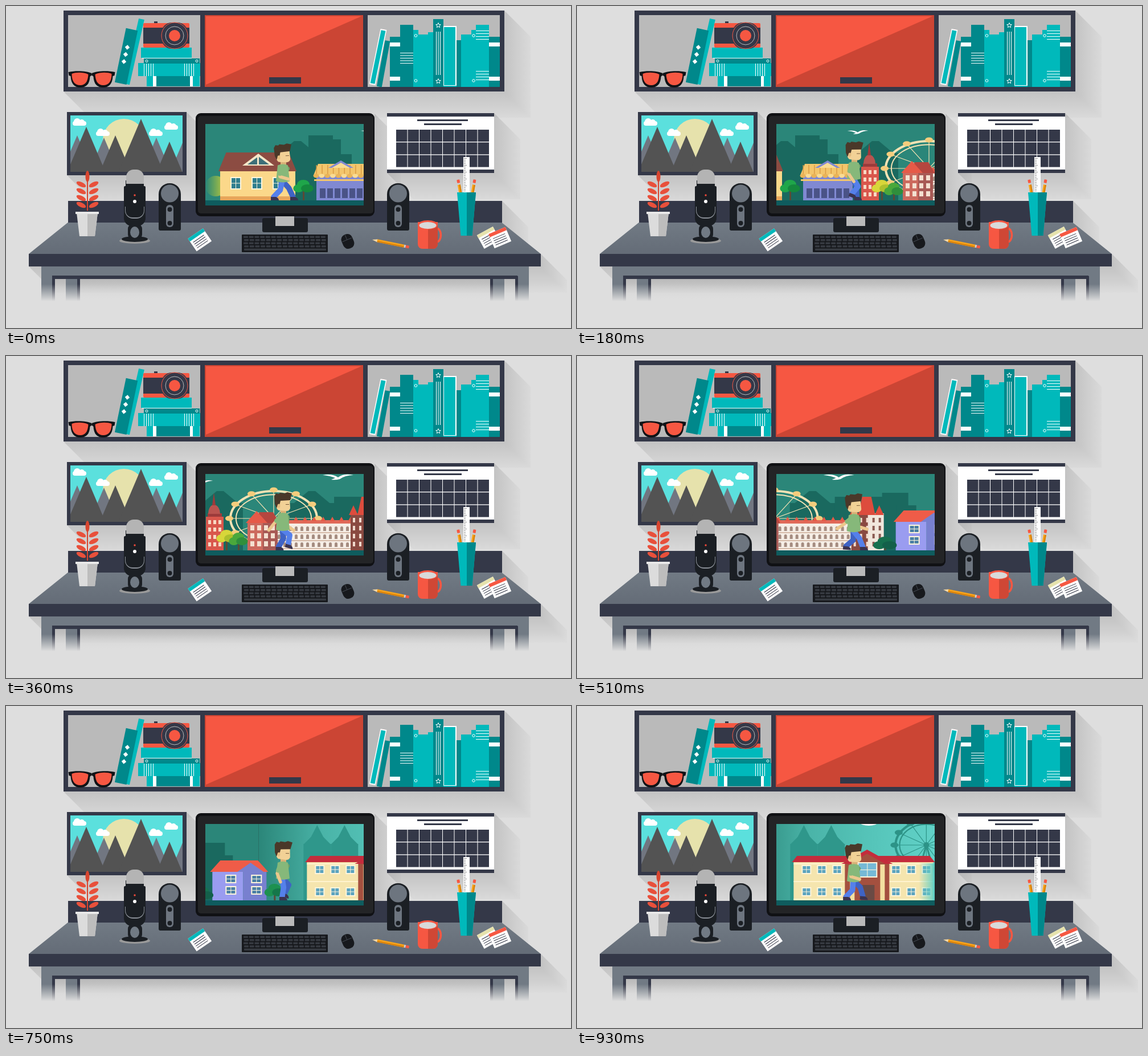
Recreate the animation shown at these times as an HTML page with a canvas. Size 992 px wide and 565 px high, loop 0.96 s.

```html
<!DOCTYPE html>
<html lang="en">
<head>
<meta charset="utf-8">
<title>Desk</title>
<style>
html, body { margin: 0; height: 100%; overflow: hidden; background: #dedede; }
canvas { display: block; }
</style>
</head>
<body>
<canvas id="stage" width="992" height="565"></canvas>
<script>
const stage = document.getElementById('stage');
const desk = document.createElement('canvas');
desk.width = stage.width;
desk.height = stage.height;
let g = desk.getContext('2d');

const { sin, cos, PI } = Math, TAU = 2 * PI;
const TEAL = '#00b9bb', DEEP = '#00888b', RED = '#f65742', BRICK = '#cb4534', DARK = '#343848';
const GREY = '#6d757f', STEEL = '#717a84', BLACK = '#1b1f24', WALL = '#dedede', WHITE = '#fff';

function rect(color, x, y, w, h, r = 0) {
  g.fillStyle = color;
  g.beginPath();
  g.roundRect(x, y, w, h, r);
  g.fill();
}
function disc(color, x, y, rx, ry = rx, turn = 0) {
  g.fillStyle = color;
  g.beginPath();
  g.ellipse(x, y, rx, ry, turn, 0, TAU);
  g.fill();
}
function ring(color, width, x, y, rx, ry = rx) {
  g.strokeStyle = color;
  g.lineWidth = width;
  g.beginPath();
  g.ellipse(x, y, rx, ry, 0, 0, TAU);
  g.stroke();
}
function trace(p) {
  g.beginPath();
  for (let i = 0; i < p.length; i += 2) g.lineTo(p[i], p[i + 1]);
}
function poly(color, ...p) {
  g.fillStyle = color;
  trace(p);
  g.fill();
}
function line(color, width, ...p) {
  g.strokeStyle = color;
  g.lineWidth = width;
  trace(p);
  g.stroke();
}
function path(color, d) {
  g.fillStyle = color;
  g.fill(new Path2D(d));
}
// Symmetric trapezoid around x; a zero top width gives a triangle.
function taper(color, x, top, bottom, topWidth, bottomWidth) {
  const a = topWidth / 2, b = bottomWidth / 2;
  poly(color, x - a, top, x + a, top, x + b, bottom, x - b, bottom);
}
function at(x, y, draw, turn = 0, flip = 1) {
  g.save();
  g.translate(x, y);
  g.rotate(turn);
  g.scale(flip, 1);
  draw();
  g.restore();
}
function grid(cols, rows, x, y, dx, dy, draw) {
  for (let i = 0; i < cols * rows; i++) {
    const col = i % cols, row = Math.floor(i / cols);
    draw(x + col * dx, y + row * dy, col, row);
  }
}
function fade(x0, y0, x1, y1, ...colors) {
  const f = g.createLinearGradient(x0, y0, x1, y1);
  colors.forEach((c, i) => f.addColorStop(i / (colors.length - 1), c));
  return f;
}
// Long 45 degree shadow that fades with its depth.
function shadow(x, y, w, h, d = 46) {
  const from = 'rgba(0,0,0,.12)', to = 'rgba(0,0,0,.02)', r = x + w, b = y + h;
  poly(fade(0, b, 0, b + d, from, to), x, b, r, b, r + d, b + d, x + d, b + d);
  poly(fade(r, 0, r + d, 0, from, to), r, y, r + d, y + d, r + d, b + d, r, b);
}

function drawGlasses() {
  for (const flip of [1, -1]) at(150.5, 0, () => {
    path('#101216', 'M0 118C-8 114-28 113-41 116l1 6 3 1Q-36 143-20 143-4 143-3 124-2 122 0 122Z');
    path(RED, 'M-6 120C-14 116-28 116-35 119Q-35 139-20 139-7 139-6 120Z');
  }, 0, flip);
}
function drawLeaningBook(x, y, w, h, turn, color, cover = color) {
  at(x, y, () => {
    rect(cover, -w / 2, 0, w, h);
    rect(color, -w / 2 + 1.5, 2, w - 3, h - 4);
  }, turn);
}
function drawCamera() {
  rect(DARK, 246, 30, 12, 5);
  rect(DARK, 260, 27, 6, 8);
  rect(RED, 241, 30, 81, 43, 2);
  rect(DARK, 241, 38, 81, 28);
  rect(DARK, 273, 29, 46, 46, 18);
  ring(RED, 1, 296, 52, 23);
  ring('#bababa', 1, 296, 52, 16);
  disc(RED, 296, 52, 10);
}
function drawStar(x, y) {
  const star = [];
  for (let i = 0; i <= 10; i++) {
    const r = i % 2 ? 2 : 4.5, a = i * PI / 5;
    star.push(x + r * sin(a), y - r * cos(a));
  }
  line(WHITE, 1, ...star);
}

function drawShelf() {
  shadow(101, 8, 774, 142);
  rect(DARK, 101, 8, 774, 142);
  for (const x of [109, 635]) rect('#bababa', x, 16, 232, 126);
  rect(BRICK, 349, 16, 278, 126);
  poly(RED, 351, 18, 624, 18, 351, 138);
  rect(DARK, 462, 125, 56, 11);

  drawGlasses();
  drawLeaningBook(238, 23, 10, 117, .224, TEAL);
  drawLeaningBook(221, 41, 21, 97, .205, DEEP);
  for (const i of [-1, 0, 1])
    at(210 - i * 3, 85 + i * 12.5, () => rect(WHITE, -3, -3, 6, 6), .9);

  rect(TEAL, 247, 123, 93, 18);
  rect(WHITE, 258, 123, 70, 18);
  rect(DEEP, 264, 123, 59, 18);
  rect(TEAL, 232, 100, 109, 23);
  for (const x of [242, 313]) grid(5, 1, x, 101, 4, 0, (x, y) => rect(WHITE, x, y, 1, 22));
  rect(DEEP, 242, 92, 98, 9);
  for (const x of [247, 335]) ring(WHITE, 1, x, 96.5, 2);
  rect(TEAL, 237, 73, 89, 18);
  rect(WHITE, 239, 91, 87, 1);
  drawCamera();

  drawLeaningBook(670, 61, 9, 82, .18, DEEP);
  drawLeaningBook(663, 41, 11, 99, .202, TEAL, WHITE);
  let x = 674;
  for (const [w, top] of [[18, 54], [23, 33], [9, 42], [17, 50], [9, 46], [18, 23], [23, 35], [8, 60], [18, 50], [8, 42], [23, 33], [19, 54]]) {
    rect(top % 4 < 2 || top === 54 ? DEEP : TEAL, x, top, w, 142 - top);
    if (top === 54) for (const y of [64, 124]) rect(WHITE, x, y, w, 7);
    if (top === 42) for (const y of [52, 131]) ring(WHITE, 1, x + w / 2, y, 2.3);
    x += w;
  }
  rect(DEEP, 692, 33, 23, 109);
  rect(TEAL, 825, 33, 23, 109);
  grid(1, 5, 692, 82, 0, 4.5, (x, y) => rect(WHITE, x, y, 23, 1));
  for (const y of [43, 114]) grid(1, 4, 825, y, 0, 5, (x, y) => rect(WHITE, x, y, 23, 1));
  rect(DEEP, 750, 23, 18, 119);
  for (const y of [34, 132]) drawStar(759, y);
  grid(3, 1, 755, 45, 3.5, 0, (x, y) => rect(WHITE, x, y, 1, 76));
  rect(WHITE, 768, 35, 23, 105);
  rect(TEAL, 769, 37, 20, 102);
}

function drawLandscape() {
  rect(DARK, 107, 186, 210, 111);
  g.save();
  g.beginPath();
  g.rect(113, 192, 197, 99);
  g.clip();
  rect('#5be0dd', 113, 192, 197, 99);
  disc('#e6e2ac', 207, 235, 37);
  const mountain = (color, x, y) => taper(color, x, y, 296, 0, (296 - y) * .85);
  for (const [x, y] of [[125, 227], [172, 231], [215, 252], [264, 231], [310, 240]]) mountain('#717681', x, y);
  for (const [x, y] of [[141, 212], [192, 227], [237, 198], [287, 238]]) mountain('#535353', x, y);
  for (const [x, y] of [[129, 204], [170, 222], [263, 222], [290, 211]]) {
    rect(WHITE, x - 12, y - 2, 24, 8, 4);
    disc(WHITE, x - 4, y - 1, 6);
    disc(WHITE, x + 4, y, 5);
  }
  g.restore();
}

function drawCalendar() {
  rect(DARK, 669, 188, 188, 105);
  rect(WHITE, 669, 194, 188, 93);
  rect(DARK, 722, 199, 89, 3);
  rect(DARK, 734, 206, 66, 3);
  grid(8, 3, 685, 217, 20.5, 22.3, (x, y) => rect(DARK, x, y, 19.5, 21));
}

function drawTable() {
  shadow(871, 342, 0, 38);
  shadow(40, 435, 899, 22);
  rect(DARK, 109, 342, 762, 40);
  taper(fade(0, 380, 0, 435, STEEL, '#646c77'), 489.5, 380, 435, 762, 899);
  rect(DARK, 40, 435, 899, 22);
  rect(STEEL, 62, 457, 856, 17);
  rect(DARK, 81, 473, 817, 6);
  rect(fade(0, 479, 0, 516, 'rgba(0,0,0,.1)', 'rgba(0,0,0,0)'), 81, 479, 817, 40);
  for (const flip of [1, -1]) at(490, 0, () => {
    rect(STEEL, -428, 474, 20, 46);
    rect(DARK, -409, 474, 5, 46);
    rect(STEEL, -385, 479, 20, 42);
    rect(DARK, -365, 479, 5, 42);
  }, 0, flip);
  rect(fade(0, 488, 0, 518, 'rgba(222,222,222,0)', WALL), 30, 488, 962, 45);
}

function drawPlant() {
  rect('#d8452f', 142, 300, 2, 62);
  disc('#d8452f', 143, 299, 3.5, 10);
  grid(2, 4, 132, 313, 22, 12, (x, y, side) => disc('#e8503b', x, y, 9, 4, side ? -.45 : .45));
  taper('#dcdcdc', 142.5, 363, 404, 37, 27);
  poly('#bdbdbd', 143, 363, 161, 363, 156, 404, 143, 404);
  rect(DARK, 122, 359, 41, 2);
  rect('#e8e8e8', 122, 361, 41, 4);
}
function drawMicrophone() {
  disc('#9a9a9a', 226, 412, 27, 5);
  disc(BLACK, 226, 409, 23, 5);
  rect(BLACK, 214, 382, 25, 28, 9);
  disc(STEEL, 226, 397, 8, 10);
  rect(BLACK, 207, 316, 38, 70, [2, 2, 14, 14]);
  rect('#8b9098', 209, 352, 34, 21, [0, 0, 14, 14]);
  rect(BLACK, 210, 306, 32, 65, [0, 0, 12, 12]);
  rect('#b4b4b4', 211, 287, 31, 25, [13, 13, 0, 0]);
  disc('#f04a3a', 226, 332, 1.7);
  disc(WHITE, 226, 343, 3);
}
function drawSpeaker(x) {
  rect(BLACK, x, 311, 39, 83, [19, 19, 3, 3]);
  disc(GREY, x + 19.5, 329, 15.5);
  rect(GREY, x + 13, 349, 13, 39, 6);
  for (const y of [357, 381]) disc(BLACK, x + 19.5, y, 4);
}
function drawMonitor() {
  rect('#101114', 333, 188, 314, 181, 9);
  rect('#232426', 337, 193, 308, 171, 5);
  rect(BLACK, 450, 372, 80, 25, 3);
  rect('#b9b9b9', 473, 369, 33, 17);
}
function drawKeyboard() {
  rect('#17191d', 414, 401, 151, 31, 1);
  grid(15, 4, 417, 403.5, 9.7, 5.5, (x, y, col, row) => rect('#363a41', x + row % 2, y, 8, 3.6, 1));
  rect('#363a41', 418, 425.5, 144, 3.6, 1);
}
function drawMouse() {
  at(600, 413, () => {
    rect('#17191d', -10, -13, 20, 26, 9);
    line('#41464e', 1, -9, -3, 9, -3);
    line('#41464e', 1, 0, -12, 0, -3);
  }, -.4);
}
function drawNote(x, y, turn, band) {
  at(x, y, () => {
    rect(WHITE, -16, -13, 32, 27);
    rect(band, -16, -13, 32, 6);
    grid(1, 4, -12, -3, 0, 4, (x, y) => rect(DARK, x, y, 23, 1));
  }, turn);
}
function drawPencil(x, y, length, turn) {
  at(x, y, () => {
    rect('#f9a51a', 9, -2.5, length - 17, 5);
    rect('#d9830e', 9, 0, length - 17, 2.5);
    poly('#f6d9a5', 0, 0, 9, -2.5, 9, 2.5);
    rect('#ccc', length - 8, -2.5, 3, 5);
    rect(RED, length - 5, -2.5, 6, 5, 1);
  }, turn);
}
function drawMug() {
  ring(RED, 3.5, 756, 402, 7.5, 12);
  rect(RED, 723, 379, 35, 47, [0, 0, 8, 8]);
  rect('#cf4735', 741, 383, 17, 43, [0, 0, 8, 0]);
  disc(RED, 740.5, 384, 17.5, 8);
  disc('#d9d9d9', 740.5, 385, 15, 6);
}
function drawPenCup() {
  rect(WHITE, 803, 265, 11, 64);
  grid(1, 20, 804, 267, 0, 3, (x, y, col, row) => rect('#777', x, y, row % 4 ? 3 : 5, .8));
  drawPencil(801, 345, 40, -1.75);
  drawPencil(816, 345, 40, -1.4);
  taper(TEAL, 808.5, 327, 403, 33, 20);
  poly(DEEP, 809, 327, 825, 327, 818.5, 403, 809, 403);
}

function drawRoom() {
  rect(WALL, 0, 0, 992, 565);
  drawShelf();
  shadow(107, 186, 210, 111);
  shadow(333, 189, 314, 180);
  shadow(669, 188, 188, 105);
  drawLandscape();
  drawCalendar();
  drawTable();
  drawPlant();
  drawMicrophone();
  for (const x of [268, 669]) drawSpeaker(x);
  drawMonitor();
  drawKeyboard();
  drawMouse();
  drawNote(340, 410, -.6, TEAL);
  drawNote(847, 406, -.5, '#e6e2ac');
  drawNote(867, 406, -.4, RED);
  drawPencil(643, 410, 65, .2);
  drawMug();
  drawPenCup();
}

function drawTree(x, y, w, color, shade) {
  rect('#5b4a35', x - 1, y, 3, 341 - y);
  disc(color, x, y - 4, w * .32, 8);
  disc(color, x - w * .25, y + 3, w * .27, 7);
  disc(shade, x + w * .2, y + 3, w * .32, 7);
}
function drawWindow(x, y, w = 13, h = 12, glass = '#5aa3bf') {
  rect('#fff6dc', x - 2, y - 2, w + 4, h + 4);
  rect(glass, x, y, w, h);
  rect('#fff6dc', x + w / 2 - .5, y, 1, h);
  rect('#fff6dc', x, y + h / 2 - .5, w, 1);
}
function drawBird(x, y, size) {
  at(x, y, () => {
    g.scale(size, size);
    path(WHITE, 'M-27 0Q-10-3 0 4 10-4 27 0 13 0 3 7-4 9-12 8L-5 5Q-14 1-27 0Z');
  });
}
function drawWheel(x, y, rx, ry, rim, cabin) {
  ring(rim, 4, x, y, rx, ry);
  ring(rim, 2, x, y, rx * .87, ry * .87);
  for (let a = 0; a < TAU; a += PI / 6) {
    line(rim, 1.2, x, y, x + rx * cos(a), y + ry * sin(a));
    disc(cabin, x + (rx + 2) * cos(a), y + (ry + 2) * sin(a), 7, 4.5);
  }
  for (const side of [-1, 1]) line(rim, 3, x, y, x + 28 * side, 341);
  disc(cabin, x, y, 5);
}

function drawSky() {
  rect('#2b8679', 340, 200, 720, 150);
  rect(fade(1060, 0, 1400, 0, '#2b8679', '#4ab4a8', '#56c5ba', '#62d2c8'), 1060, 200, 400, 150);
  const far = '#1a695f';
  for (const x of [512, 672, 833]) {
    taper(far, x, 237, 262, 12, 72);
    rect(far, x - 40, 258, 80, 85);
  }
  for (const [x, w, top] of [[531, 43, 227], [560, 28, 234], [560, 47, 260], [872, 100, 247], [955, 46, 240], [980, 35, 262]])
    rect(far, x, top, w, 115);
  const wheel = '#2d9387';
  drawWheel(1378, 244, 54, 42, wheel, wheel);
  for (const x of [1163, 1211]) {
    taper('#2f978b', x, 209, 232, 0, 24);
    taper('#2f978b', x, 230, 243, 22, 48);
    rect('#2f978b', x - 24, 242, 48, 100);
  }
  disc(WHITE, 1277, 205, 15, 5);
  drawBird(641, 219, .68);
  drawBird(879, 209, 1);
}

function drawCottage() {
  disc(fade(350, 0, 380, 0, 'rgba(150,190,60,0)', '#a9bf45'), 368, 316, 18);
  rect('#fbd88a', 376, 288, 132, 53);
  rect('#e8a65a', 376, 334, 132, 7);
  taper('#8c4c42', 441.5, 257, 290, 110, 137);
  taper('#f4e7c8', 443, 259, 280, 0, 56);
  taper('#3d6f78', 443, 264, 278, 0, 38);
  rect('#f4e7c8', 441, 262, 3, 17);
  grid(3, 1, 396, 302, 37, 0, (x, y) => drawWindow(x, y, 15, 18, '#2f7e8e'));
}
function drawShop() {
  rect('#8089d2', 545, 298, 87, 43);
  taper('#f3c66c', 588, 277, 298, 80, 97);
  grid(10, 1, 544.5, 298, 9.8, 0, (x, y, i) => {
    rect('#d99b45', x, 279, 1.5, 18);
    disc(i % 2 ? '#f9dc94' : '#e9b357', x, y, 4.9, 3.5);
  });
  taper('#8089d2', 588, 271, 284, 0, 44);
  taper('#f9dc94', 588, 275, 284, 0, 32);
  rect('#f3c66c', 541, 304, 94, 3);
  grid(6, 1, 551, 320, 13, 0, (x, y) => rect('#4a5387', x, y, 10, 17));
}
function drawTower() {
  rect('#d9574c', 647, 282, 31, 59);
  rect('#9c3b3b', 650, 276, 25, 6);
  path('#b9544f', 'M651 277Q651 264 661 260 672 264 672 277Z');
  taper('#9c3b3b', 661, 240, 262, 0, 6);
  grid(3, 4, 651, 288, 9, 13, (x, y) => rect('#f7d9c4', x, y, 5, 7));
}
function drawPalace() {
  rect('#f6eee6', 758, 294, 148, 47);
  rect('#e06a59', 758, 288, 148, 6);
  grid(9, 1, 773, 282, 16, 0, (x, y) => taper('#e65a48', x, y, 290, 0, 9));
  grid(14, 3, 763, 299, 10, 14, (x, y) => rect('#a58c80', x, y, 5, 8, [3, 3, 0, 0]));
  grid(1, 3, 758, 309, 0, 14, (x, y) => rect('#d6bba9', x, y, 148, 2));

  rect('#cc6a5e', 720, 292, 27, 49);
  rect('#a85a55', 747, 292, 26, 49);
  taper('#b5463f', 753, 274, 293, 24, 46);
  taper('#e65a48', 736, 272, 293, 0, 38);
  grid(4, 3, 725, 297, 12, 14, (x, y) => rect('#f4e0d0', x, y, 7, 9));
}
function drawCastle() {
  rect('#8a4a41', 901, 276, 36, 65);
  rect('#f1e6dc', 930, 276, 28, 65);
  for (const x of [906, 950]) taper('#dd4c3d', x, 262, 279, 0, 16);
  taper('#dd4c3d', 928, 247, 279, 16, 30);
  grid(5, 4, 905, 284, 11, 14, (x, y, col) => rect(col < 3 ? '#f1d9cc' : '#8a5a52', x, y, 4, 8));
}
function drawVilla() {
  rect('#9a9cf0', 979, 288, 54, 53);
  rect('#7880cf', 1033, 288, 41, 53);
  taper('#ef5c48', 1026, 271, 291, 66, 102);
  taper('#7880cf', 1046, 275, 291, 0, 46);
  grid(2, 2, 1004, 298, 45, 20, (x, y) => drawWindow(x, y, 15, 11, '#4a7fa4'));
}
function drawHotel() {
  rect('#f5e5ae', 1145, 272, 245, 69);
  grid(1, 3, 1145, 276, 0, 31, (x, y) => rect('#fff3cf', x, y, 245, 2));
  taper('#c42c3c', 1267.5, 263, 274, 233, 251);
  for (const x of [1161, 1318]) grid(3, 2, x, 281, 27, 39, (x, y) => drawWindow(x, y));
  rect('#a4503f', 1235, 272, 78, 69);
  for (const x of [1244, 1297]) rect('#f3dfa0', x, 274, 8, 67);
  taper('#c42c3c', 1274, 252, 277, 0, 90);
  taper('#a4503f', 1274, 259, 278, 0, 66);
  drawWindow(1259, 276, 31, 23, '#76b9d6');
  rect('#6a4a44', 1263, 314, 24, 27);
  rect(fade(1365, 0, 1394, 0, 'rgba(95,207,196,0)', '#5fcfc4'), 1362, 276, 34, 65);
}
function drawTown() {
  drawWheel(766, 285, 76, 48, '#f5e3b4', '#f4cd7d');
  drawCottage();
  drawShop();
  drawTower();
  drawPalace();
  drawCastle();
  drawVilla();
  drawHotel();
  drawTree(522, 317, 34, '#1fa64a', '#15883d');
  drawTree(683, 317, 34, '#d8d63a', '#aebf2c');
  drawTree(704, 322, 32, '#4aa83b', '#2f8f3c');
  drawTree(960, 329, 40, '#17704f', '#14604a');
  drawTree(1088, 324, 34, '#1d9150', '#15774a');
}

// The foot slides back during the first half of its phase and swings forward in the second.
function drawLeg(hipY, phase, color) {
  const p = phase % 1, lift = Math.max(0, -sin(p * TAU));
  const x = 487 + 17 * (Math.abs(p - .5) * 4 - 1), y = 335 - 6 * lift;
  const dx = x - 485, dy = y - hipY, d = Math.hypot(dx, dy);
  const bend = Math.sqrt(Math.max(6, 280 - d * d / 4)) / d;
  line(color, 9.5, 485, hipY, 485 + dx / 2 + dy * bend, hipY + dy / 2 - dx * bend, x, y);
  at(x, y + 2, () => path('#3b3350', 'M-5-2L4-2Q9 0 9 4L-5 4Z'), .4 * lift);
}
function drawArm(x, y, swing, sleeve) {
  const upper = .45 * swing - .45, lower = upper + .6 + .7 * swing;
  const ex = x + 14 * sin(upper), ey = y + 14 * cos(upper);
  line('#ecc78c', 5.5, x, y, ex, ey, ex + 16 * sin(lower), ey + 16 * cos(lower));
  line(sleeve, 8, x, y, x + (ex - x) * .6, y + (ey - y) * .6);
}
function drawHead() {
  path('#f2d196', 'M-13-12L12-12 13 5Q12 10 6 10L-7 9Q-13 7-13-12Z');
  path('#4a3829', 'M-15-16L-12-21-7-20-5-22 3-21 8-23 16-21 13-9-4-8-6 0-9 0-11 5-14-2Z');
  disc('#e6bd80', -7, 1, 2.5, 3.5);
  rect('#7a5c3d', 5, -2, 6, 1);
}
function drawWalker(phase) {
  const swing = cos(phase * TAU), bob = 2.5 * cos(phase * 2 * TAU);
  g.lineJoin = g.lineCap = 'round';
  drawArm(494, 283 + bob, Math.max(-swing, -.2), '#6fa067');
  drawLeg(304 + bob, phase, '#3f63c4');
  drawLeg(304 + bob, phase + .5, '#5580ea');
  at(486, 262 + bob, () => {
    rect('#d9b177', -4, 6, 10, 10);
    path('#86b87a', 'M-9 15Q0 11 9 15L12 43Q0 47-12 43Z');
    at(0, 0, drawHead, -bob * .02);
  });
  drawArm(481, 283 + bob, swing, '#86b87a');
}

const LOOP = 960, STEP = 30, SPEED = 148 / 180;

function frame() {
  const t = Math.floor(performance.now() % LOOP / STEP) * STEP;
  g.drawImage(desk, 0, 0);
  g.save();
  g.beginPath();
  g.rect(350, 207, 278, 143);
  g.clip();
  at(-SPEED * t, 0, () => {
    drawSky();
    drawTown();
  });
  rect('#0f5c5e', 350, 341, 278, 9);
  drawWalker(t / LOOP);
  g.restore();
  requestAnimationFrame(frame);
}
drawRoom();
g = stage.getContext('2d');
frame();
</script>
</body>
</html>
```
